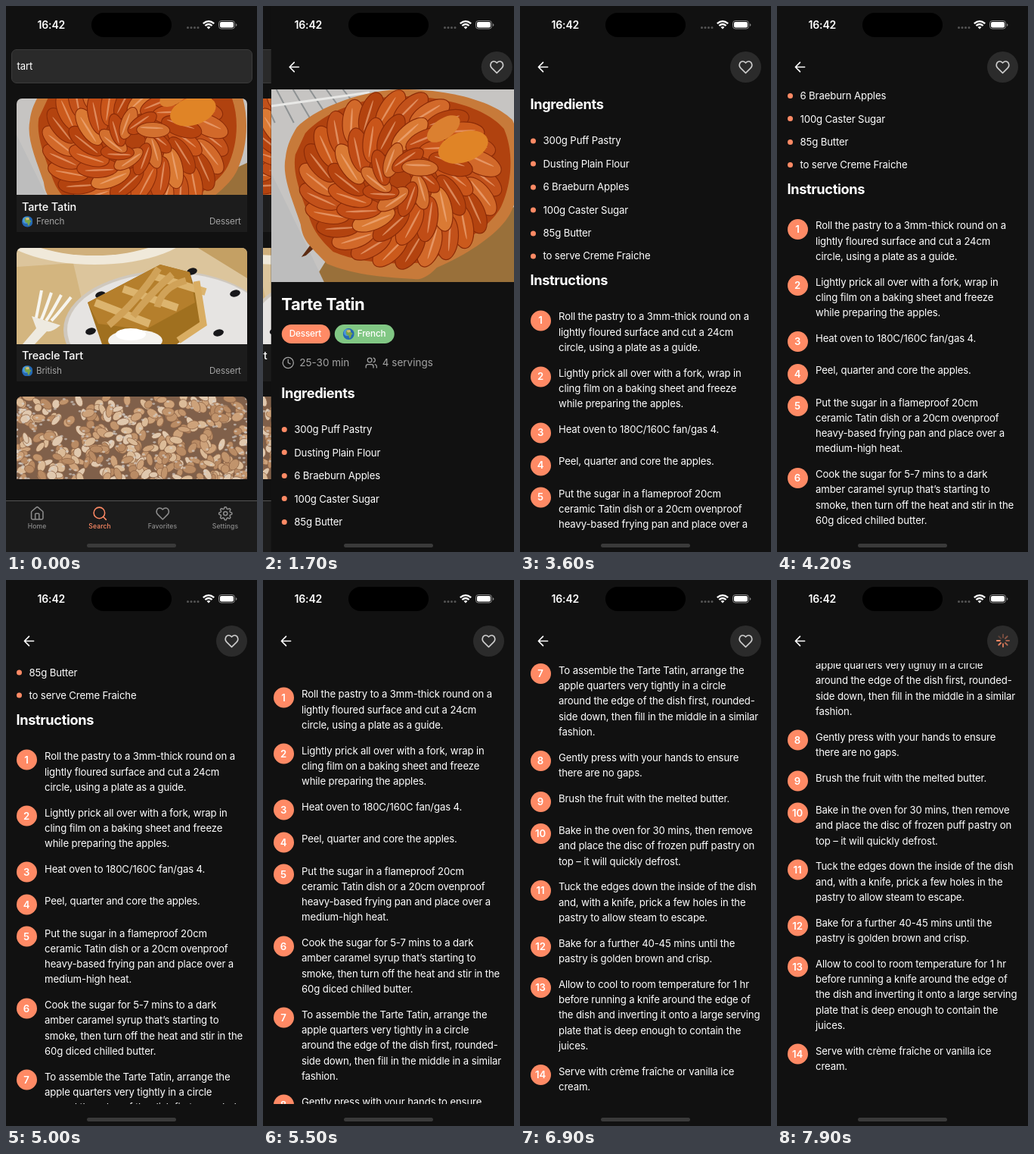
Animation, 332 px wide and 720 px high, one loop 8000 ms. Source, as an HTML page:

```html
<!DOCTYPE html>
<html lang="en">
<head>
<meta charset="utf-8">
<title>Recipe search</title>
<style>
html, body { margin: 0; width: 100%; height: 100%; overflow: hidden; background: #111; }
#stage { position: relative; width: 332px; height: 720px; overflow: hidden; color: #fff;
  font: 13.2px/20.28px Inter, "Open Sans", sans-serif; letter-spacing: -.011em; }
#stage div, #stage span, #stage svg { position: absolute; }
#stage span { white-space: nowrap; }
svg { overflow: hidden; }
.page { inset: 0; background: #111; }
.icon { overflow: visible; fill: none; stroke: currentColor; stroke-width: 1.8; stroke-linecap: round; stroke-linejoin: round; }
.clock { font-size: 14px; font-weight: 600; }
.island { left: 113px; top: 9px; width: 106px; height: 32px; border-radius: 16px; background: #000; }
.indicator { left: 107px; top: 709px; width: 118px; height: 5px; border-radius: 3px; background: #3a3a3a; }
.field { left: 7px; top: 57px; width: 317px; height: 43px; border: 1px solid #3b3b3b; border-radius: 7px; background: #2a2a2a; }
.list { left: 0; top: 110px; width: 332px; height: 514px; overflow: hidden; }
.card { left: 13.5px; width: 305px; height: 176px; border-radius: 7px 7px 0 0; overflow: hidden; background: #1c1c1c; }
.card .name { font-size: 14.5px; font-weight: 500; }
.card .note { font-size: 11.7px; color: #a3a3a3; }
.tabs { left: 0; top: 652px; width: 332px; height: 68px; box-sizing: border-box; border-top: 1px solid #555; background: #1b1b1b; color: #8c8c8c; }
.tabs .label { width: 80px; text-align: center; font-size: 8.6px; font-weight: 500; letter-spacing: .01em; }
.active { color: #ff8a65; }
.scroller { left: 0; top: 110px; width: 332px; height: 581px; overflow: hidden; }
.title { font-size: 22px; font-weight: 700; letter-spacing: -.02em; }
.heading { font-size: 18.2px; font-weight: 700; letter-spacing: -.02em; }
.chip { height: 25.4px; border-radius: 13px; }
.chiptext { font-size: 11.7px; font-weight: 500; }
.meta { font-size: 13.5px; color: #a3a3a3; letter-spacing: 0; }
.bullet { left: 13.5px; width: 7px; height: 7px; border-radius: 50%; background: #ff8a65; }
.badge { left: 13.5px; width: 27px; height: 27px; border-radius: 50%; background: #ff8a65; line-height: 27px; text-align: center; font-weight: 600; }
.round { left: 278px; top: 59.5px; width: 41px; height: 41px; border-radius: 50%; background: #2b2b2b; }
</style>
</head>
<body>
<div id="stage"></div>
<script>
const LINE = 20.28;
const INGREDIENTS = ['300g Puff Pastry', 'Dusting Plain Flour', '6 Braeburn Apples',
  '100g Caster Sugar', '85g Butter', 'to serve Creme Fraiche'];
const STEPS = [
  'Roll the pastry to a 3mm-thick round on a|lightly floured surface and cut a 24cm|circle, using a plate as a guide.',
  'Lightly prick all over with a fork, wrap in|cling film on a baking sheet and freeze|while preparing the apples.',
  'Heat oven to 180C/160C fan/gas 4.',
  'Peel, quarter and core the apples.',
  'Put the sugar in a flameproof 20cm|ceramic Tatin dish or a 20cm ovenproof|heavy-based frying pan and place over a|medium-high heat.',
  'Cook the sugar for 5-7 mins to a dark|amber caramel syrup that’s starting to|smoke, then turn off the heat and stir in the|60g diced chilled butter.',
  'To assemble the Tarte Tatin, arrange the|apple quarters very tightly in a circle|around the edge of the dish first, rounded-|side down, then fill in the middle in a similar|fashion.',
  'Gently press with your hands to ensure|there are no gaps.',
  'Brush the fruit with the melted butter.',
  'Bake in the oven for 30 mins, then remove|and place the disc of frozen puff pastry on|top – it will quickly defrost.',
  'Tuck the edges down the inside of the dish|and, with a knife, prick a few holes in the|pastry to allow steam to escape.',
  'Bake for a further 40-45 mins until the|pastry is golden brown and crisp.',
  'Allow to cool to room temperature for 1 hr|before running a knife around the edge of|the dish and inverting it onto a large serving|plate that is deep enough to contain the|juices.',
  'Serve with crème fraîche or vanilla ice|cream.'
];

const repeat = (n, make) => Array.from({ length: n }, (_, i) => make(i)).join('');
const path = (d, fill, extra = '') => `<path d="${d}" fill="${fill}" ${extra}/>`;
const line = (d, color, width) => path(d, 'none', `stroke="${color}" stroke-width="${width}"`);
const ellipse = (x, y, rx, ry, fill, turn = 0, extra = '') =>
  `<ellipse rx="${rx}" ry="${ry}" fill="${fill}" transform="translate(${x} ${y}) rotate(${turn})" ${extra}/>`;

// Text is placed by its left edge and the middle of its first line.
const text = (x, y, content, cls = '') =>
  `<span class="${cls}" style="left:${x}px;top:${y - LINE / 2}px">${content}</span>`;
const svg = (x, y, w, h, box, content, cls = '') =>
  `<svg class="${cls}" style="left:${x}px;top:${y}px" width="${w}" height="${h}" viewBox="${box}" preserveAspectRatio="xMidYMid slice">${content}</svg>`;

const gear = 'M' + Array.from({ length: 96 }, (_, i) => {
  const a = i * Math.PI / 48, r = 8.8 + 1.3 * Math.tanh(2 * Math.cos(8 * a));
  return (12 + r * Math.sin(a)).toFixed(2) + ' ' + (12 - r * Math.cos(a)).toFixed(2);
}).join('L') + 'Z';
const ICONS = {
  home: '<path d="M15 21v-8a1 1 0 0 0-1-1h-4a1 1 0 0 0-1 1v8M3 10a2 2 0 0 1 .7-1.5l7-6a2 2 0 0 1 2.6 0l7 6a2 2 0 0 1 .7 1.5v9a2 2 0 0 1-2 2H5a2 2 0 0 1-2-2z"/>',
  search: '<circle cx="11" cy="11" r="8.5"/><path d="M21.5 21.5l-4.5-4.5"/>',
  heart: '<path d="M12 21L4.5 13.6C.5 9.5 3 3.5 7.5 3.5c2 0 3.2.8 4.5 2.3 1.3-1.5 2.5-2.3 4.5-2.3 4.5 0 7 6 3 10.1z"/>',
  settings: `<path d="${gear}"/><circle cx="12" cy="12" r="3"/>`,
  clock: '<circle cx="12" cy="12" r="10"/><path d="M12 6v6l4 2"/>',
  users: '<circle cx="9" cy="7" r="4"/><path d="M2 21v-2a4 4 0 0 1 4-4h6a4 4 0 0 1 4 4v2M16 3.1a4 4 0 0 1 0 7.8M22 21v-2a4 4 0 0 0-3-3.9"/>',
  back: '<path d="M19 12H5M12 5l-7 7 7 7"/>'
};
const icon = (name, x, y, size) => svg(x - size / 2, y - size / 2, size, size, '0 0 24 24', ICONS[name], 'icon');
const globe = (x, y, size) => svg(x - size / 2, y - size / 2, size, size, '0 0 16 16',
  '<circle cx="8" cy="8" r="8" fill="#2468b4"/>' + ellipse(6, 6, 5, 5, '#4a95d8') +
  path('M4 5C5 2 8 1 10 2l1 3 3 3-2 1-1 4-2 1-1-4-3-1z', '#79a548') + path('M5 3l5-1 1 3-4 1z', '#d3bd7a'));

function tartTatin() {
  // Each slice covers part of the one before, which leaves overlapping crescents.
  const ring = (n, r, len, wide, tones) => repeat(n, i => {
    const a = i / n * 2 * Math.PI, x = 171 + r * 1.18 * Math.cos(a), y = 119 + r * Math.sin(a);
    const turn = a * 180 / Math.PI + 38;
    return ellipse(x, y, len, wide, tones[i % tones.length], turn, 'stroke="#8c2c08" stroke-width="1.2"') +
      ellipse(x + 4 * Math.sin(a), y - 4 * Math.cos(a), len * .7, 1.3, '#f3b58a', turn, 'opacity=".6"');
  });
  return '<rect width="332" height="254" fill="#c6c4c2"/>' +
    path('M55 254L75 222 190 215 332 150V254z', '#99703a') +
    path('M0 110Q30 170 70 254H0z', '#bdbdbd') +
    repeat(6, i => line(`M${i * 22 - 15} 0l${20 + i * 3} 44`, '#8e9293', 2)) + line('M0 22L130 4', '#e8e8e6', 3) +
    path('M40 221l18-24 8 4-20 18z', '#5b2b12') +
    path('M34 50C55 28 110 3 169 0 225 -1 290 12 319 40 336 75 334 125 318 160 305 190 255 220 219 235 205 250 195 251 189 250 145 248 105 243 74 230 50 205 42 200 39 178 28 145 14 115 19 90 21 72 28 60 34 50z', '#c77a3a') +
    path('M45 58C70 30 120 10 170 9 225 8 285 24 308 52 322 85 318 125 304 155 288 185 240 210 205 228 160 232 115 228 82 214 62 195 56 185 50 168 38 135 28 110 32 86z', '#b0420f') +
    ring(26, 92, 30, 15, ['#c2511a', '#d2692a', '#b3430f', '#cb5a1c']) +
    ring(18, 60, 30, 14, ['#c9551a', '#b5430f', '#da7a34', '#c04c16']) +
    ring(10, 27, 24, 11, ['#bb4712', '#d3702f']) +
    ellipse(254, 76, 34, 20, '#e08426', -18) + ellipse(228, 52, 25, 13, '#db8030', -35);
}

function treacleTart() {
  const dots = [[289, 60], [267, 112], [111, 62], [98, 110], [232, 31]];
  return '<rect width="305" height="127" fill="#dcc59c"/>' +
    path('M0 25L75 20 100 127H0z', '#d3b57f') +
    ellipse(103, -28, 130, 50, '#f0e9da') + ellipse(103, -34, 112, 44, '#d0b07c') +
    path('M240 0h65v40z', '#c4a064') +
    ellipse(200, 108, 138, 78, '#cfc8be') + ellipse(202, 108, 135, 75, '#e6e4e2') +
    dots.map(([x, y]) => ellipse(x, y, 7, 4.5, '#17171a', -15)).join('') +
    repeat(4, i => line(`M${33 + i * 13} ${56 + i * 3}Q${27 + i * 9} 88 ${25 + i * 7} 96`, '#f7f5ee', 4)) +
    path('M20 90L58 102Q46 112 40 110L24 127H8L26 106z', '#eeeae0') +
    path('M94 72L190 22 229 32 249 100 212 127H113z', '#a0701f') +
    path('M94 72L190 22 229 32 236 72 170 108 108 100z', '#b57f2c') +
    repeat(3, i => line(`M${104 + i * 37} ${72 - i * 18}l72 ${28 - i * 3}`, '#dcb46e', 10)) +
    repeat(3, i => line(`M${122 + i * 32} ${102 - i * 12}Q${160 + i * 16} ${70 - i * 9} ${188 + i * 18} ${27 + i * 8}`, '#d0a258', 9)) +
    line('M238 44L247 100 214 122', '#d9ad62', 9) +
    ellipse(157, 122, 36, 14, '#f4f2ee') + ellipse(151, 114, 20, 8, '#fff');
}

function almondTart() {
  let seed = 7;
  const random = () => (seed = seed * 16807 % 2147483647) / 2147483647;
  const flakes = ['#cda27a', '#dbbb98', '#b98b64', '#e0c8ae', '#c1946c'];
  return '<rect width="305" height="127" fill="#80604a"/>' +
    repeat(380, i => ellipse(random() * 305, random() * 127, 5 + random() * 4, 3.5 + random() * 2.5,
      flakes[i % 5], random() * 180, 'stroke="#8b6144" stroke-width=".7"')) +
    repeat(260, i => ellipse((i % 2 ? 0 : 305) + (i % 2 ? 1 : -1) * random() ** 2 * 190, random() * 127, 2, 1.4, '#d8d4d0', 0, 'opacity=".6"'));
}

const card = (top, image, box, name, origin) => `<div class="card" style="top:${top - 110}px">
  ${svg(0, 0, 305, 127, box, image)}${text(7.5, 143, name, 'name')}${globe(14.5, 162.5, 14.5)}
  ${text(26.5, 162.5, origin, 'note')}${text(255.5, 162.5, 'Dessert', 'note')}</div>`;

const tab = (name, label, x, cls = '') => `<div class="${cls}" style="left:${x - 40}px;top:0">
  ${icon(name, 40, 16, 20.5)}${text(0, 33.5, label, 'label')}</div>`;

function searchPage() {
  return `<div class="page" id="search"><div class="field"></div>${text(14.5, 79, 'tart')}
    <div class="list">
      ${card(122, tartTatin(), '0 0 332 254', 'Tarte Tatin', 'French')}
      ${card(318.5, treacleTart(), '0 0 305 127', 'Treacle Tart', 'British')}
      ${card(515, almondTart(), '0 0 305 127', '', '')}
    </div>
    <div class="tabs">${tab('home', 'Home', 41)}${tab('search', 'Search', 124, 'active')}
      ${tab('heart', 'Favorites', 207)}${tab('settings', 'Settings', 290)}</div></div>`;
}

function stepList() {
  let y = 790.5 - 110;
  return STEPS.map((step, i) => {
    const lines = step.split('|');
    const html = `<div class="badge" style="top:${y - 8.8}px">${i + 1}</div>` + text(51, y, lines.join('<br>'));
    y += Math.max(lines.length * LINE, 28.7) + 13.52;
    return html;
  }).join('');
}

const chip = (x, w, color) => `<div class="chip" style="left:${x}px;top:309.7px;width:${w}px;background:${color}"></div>`;

function recipePage() {
  const spokes = repeat(8, i => `<path d="M0-4.2V-8" stroke="#ff8a65" stroke-width="2" stroke-linecap="round"
    opacity="${1 - i * .11}" transform="rotate(${-90 - i * 45})"/>`);
  return `<div class="page" id="recipe"><div class="scroller"><div id="content">
      ${svg(0, 0, 332, 254, '0 0 332 254', tartTatin())}
      ${text(13.5, 283, 'Tarte Tatin', 'title')}
      ${chip(13.5, 64, '#ff8a65')}${text(24, 322.5, 'Dessert', 'chiptext')}
      ${chip(84, 79, '#81c784')}${globe(102.5, 322.5, 15)}${text(114, 322.5, 'French', 'chiptext')}
      <div style="color:#a3a3a3">${icon('clock', 22, 360, 17)}${icon('users', 132, 360, 17)}</div>
      ${text(37.5, 360, '25-30 min', 'meta')}${text(147, 360, '4 servings', 'meta')}
      ${text(13.5, 400, 'Ingredients', 'heading')}
      ${INGREDIENTS.map((item, i) => `<div class="bullet" style="top:${445 + i * 30.42}px"></div>` + text(30.5, 448.5 + i * 30.42, item)).join('')}
      ${text(13.5, 632, 'Instructions', 'heading')}${stepList()}
    </div></div>
    ${icon('back', 30.5, 80, 21)}<div class="round"></div>
    <div id="heart" style="color:#ccc">${icon('heart', 298.5, 80, 21)}</div>
    <div id="spinner">${svg(288.5, 70, 20, 20, '-10 -10 20 20', spokes)}</div></div>`;
}

const statusBar = text(41.5, 25, '16:42', 'clock') + '<div class="island"></div>' +
  svg(0, 0, 332, 44, '0 0 332 44',
    repeat(4, i => ellipse(240.5 + i * 4.5, 28.5, 1.5, 1.5, '#555')) +
    line('M260.8 23.2Q268 17 275.2 23.2M263.4 26Q268 22 272.6 26', '#fff', 2.3) + path('M265.5 27.8Q268 26 270.5 27.8L268 30.5z', '#fff') +
    '<rect x="281.5" y="19.5" width="21" height="10.5" rx="3.3" fill="none" stroke="#888"/><rect x="283" y="21" width="18" height="7.5" rx="2" fill="#fff"/>' +
    path('M304 23v4q1.5-.8 1.5-2T304 23z', '#888')) + '<div class="indicator"></div>';

const $ = id => document.getElementById(id);
$('stage').innerHTML = searchPage() + recipePage() + statusBar;

// Scroll keys [time, offset], joined by a monotone cubic.
const SCROLL = [[2400, 0], [3000, 200], [3300, 300], [4200, 501], [5000, 558.5], [6100, 789], [6900, 1094], [7800, 1121.5]];
const rate = i => (SCROLL[i + 1][1] - SCROLL[i][1]) / (SCROLL[i + 1][0] - SCROLL[i][0]);
const slope = i => i === 0 || i === SCROLL.length - 1 ? 0 : 2 * rate(i - 1) * rate(i) / (rate(i - 1) + rate(i));
function scrollAt(t) {
  if (t <= SCROLL[0][0]) return 0;
  const i = SCROLL.findIndex(([time]) => time >= t) - 1;
  if (i < 0) return SCROLL[SCROLL.length - 1][1];
  const [t0, y0] = SCROLL[i], [t1, y1] = SCROLL[i + 1], d = t1 - t0, u = (t - t0) / d;
  const ease = u * u * (3 - 2 * u);
  return y0 + (y1 - y0) * ease + d * u * (1 - u) * ((1 - u) * slope(i) - u * slope(i + 1));
}

function pushAt(t) {
  const u = Math.max(0, t - 1250) * .0117;
  return t >= 2100 ? 0 : 332 * (1 + u) * Math.exp(-u);
}

function draw() {
  const t = Math.floor(performance.now() % 8000 / 100) * 100;
  const x = pushAt(t);
  $('search').style.transform = `translateX(${-.3 * (332 - x)}px)`;
  $('recipe').style.transform = `translateX(${x}px)`;
  $('content').style.transform = `translateY(${-scrollAt(t)}px)`;
  $('heart').style.display = t < 7800 ? '' : 'none';
  $('spinner').style.display = t < 7800 ? 'none' : '';
  requestAnimationFrame(draw);
}
draw();
</script>
</body>
</html>
```
